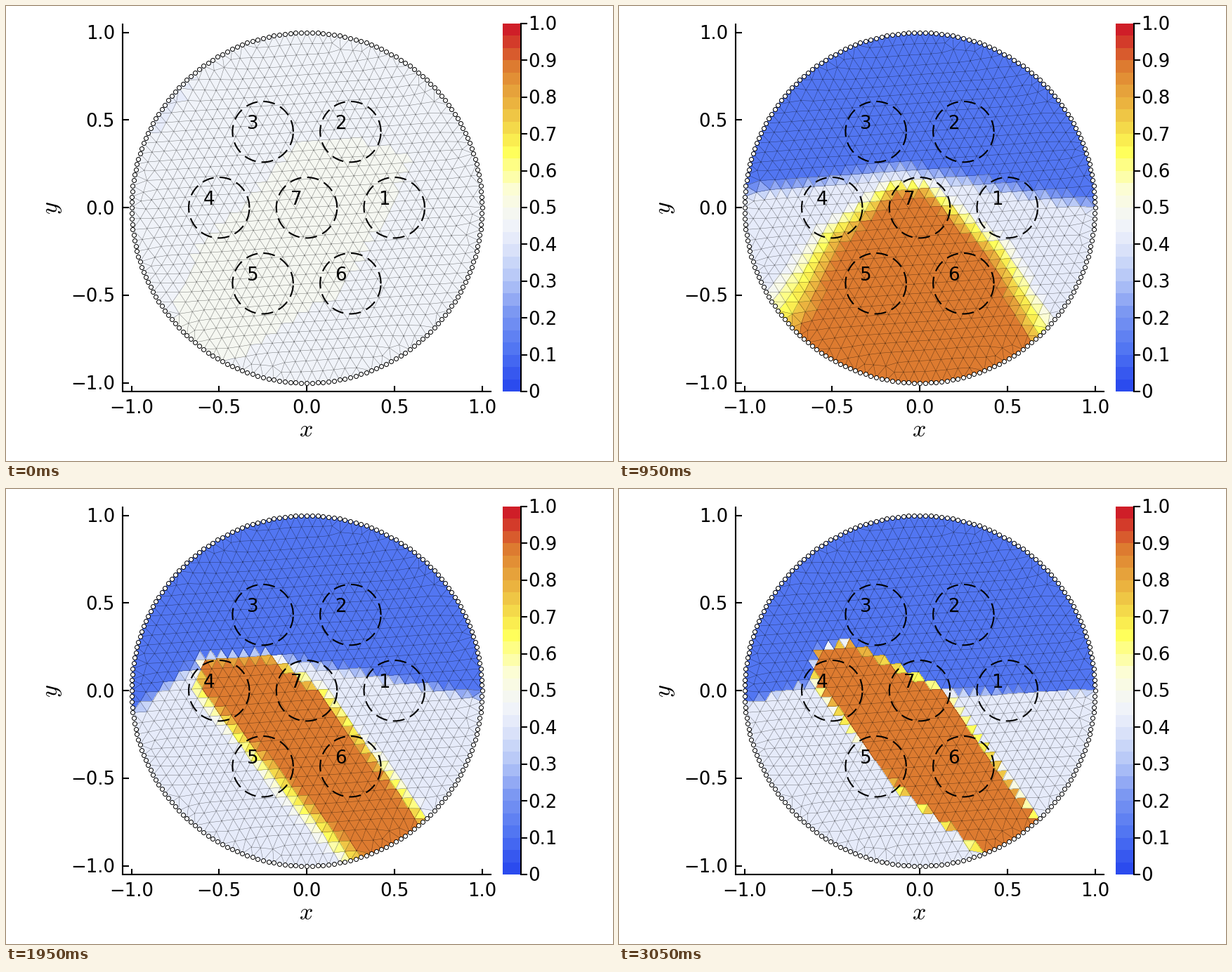
Write a matplotlib script that moves like this. It is 864 px wide and 648 px high and loops after 3.1 s.

```python
import numpy as np
import matplotlib.pyplot as plt
from matplotlib.animation import FuncAnimation
from matplotlib.colors import LinearSegmentedColormap, ListedColormap
from matplotlib.path import Path
from matplotlib.tri import Triangulation

FRAMES, STEP = 62, 50
CX, CY, R = 428, 287.2, 249.5
LEVELS = 30
LOW, MID, HIGH = 0.11, 0.41, 0.895

STOPS = [(0, "#2b4bee"), (.103, "#5276f2"), (.2, "#7a96f2"), (.3, "#b6c7f7"),
         (.414, "#e7ecfa"), (.448, "#f0f3f9"), (.483, "#f5f7f1"),
         (.55, "#fcfdd7"), (.66, "#ffff55"), (.72, "#f5dc4b"),
         (.897, "#dd7c30"), (1, "#cf1e28")]
ramp = LinearSegmentedColormap.from_list("heat", STOPS)
cmap = ListedColormap(ramp(np.linspace(0, 1, LEVELS)))

# Time, softness at the top and lower left, height of the upper front at
# KNOTS, outline of the hot region.
KNOTS = [180, 260, 400, 677]
KEYS = [
    (350, (34, 34), (247, 247, 256, 276),
     [(110, 640), (150, 480), (170, 348), (300, 343), (450, 361),
      (700, 404), (695, 650)]),
    (950, (24, 85), (263, 254, 228, 283),
     [(110, 640), (236, 430), (300, 325), (390, 256), (438, 258),
      (545, 350), (695, 650)]),
    (1500, (20, 45), (302, 261, 245, 315),
     [(500, 520), (400, 428), (310, 285), (315, 252), (398, 249),
      (545, 372), (565, 515)]),
    (1950, (15, 35), (318, 255, 240, 296),
     [(500, 535), (422, 455), (272, 285), (278, 242), (374, 236),
      (450, 288), (640, 527)]),
    (2300, (11, 21), (323, 258, 246, 297),
     [(505, 528), (375, 412), (273, 267), (284, 223), (350, 221),
      (445, 288), (640, 527)]),
    (3050, (8, 8), (306, 278, 290, 287),
     [(517, 519), (395, 426), (275, 271), (281, 229), (327, 217),
      (463, 286), (640, 535)]),
]
TIMES = [k[0] for k in KEYS]
SHAPES = [[np.array(p, float) for p in k[1:]] for k in KEYS]

WARM_START = [(412, 195), (500, 188), (575, 212), (545, 290), (478, 405),
              (310, 512), (235, 445), (275, 340), (340, 280)]
COOL_START = [(275, 92), (213, 184), (195, 180), (225, 125)]


def make_mesh(h=15.6, tilt=np.radians(4), rim_count=100):
    """Tilted triangular lattice, relaxed towards the round rim."""
    a = 2 * np.pi * np.arange(rim_count) / rim_count
    rim = R * np.c_[np.cos(a), np.sin(a)]
    i, j = np.meshgrid(np.arange(-40, 41), np.arange(-40, 41))
    u, v = (i + j / 2) * h, j * h * np.sqrt(3) / 2
    pts = np.c_[(u * np.cos(tilt) + v * np.sin(tilt)).ravel(),
                (v * np.cos(tilt) - u * np.sin(tilt)).ravel()]
    pts = pts[np.hypot(*pts.T) < R - 0.62 * h]
    pts = np.r_[rim, pts]
    loose = np.hypot(*pts.T) > 0.86 * R
    loose[:rim_count] = False
    for _ in range(6):
        edges = Triangulation(*pts.T).edges
        total, count = np.zeros_like(pts), np.zeros(len(pts))
        for p, q in (edges.T, edges.T[::-1]):
            np.add.at(total, p, pts[q])
            np.add.at(count, p, 1)
        pts[loose] = (total / count[:, None])[loose]
    return Triangulation(pts[:, 0] + CX, pts[:, 1] + CY)


mesh = make_mesh()
cells = np.c_[mesh.x, mesh.y][mesh.triangles].mean(axis=1)
cell_x, cell_y = cells.T
depth = np.clip((cell_y - 250) / 180, 0, 1)
left_side = cell_x < 380 + 0.5 * (cell_y - 250)


def inside(poly):
    return Path(poly).contains_points(cells)


def signed_distance(poly):
    d = np.roll(poly, -1, axis=0) - poly
    rel = cells[:, None] - poly
    s = np.clip((rel * d).sum(-1) / (d * d).sum(-1), 0, 1)
    gap = rel - s[..., None] * d
    dist = np.hypot(gap[..., 0], gap[..., 1]).min(axis=1)
    return np.where(inside(poly), dist, -dist)


def shapes_at(t):
    k = int(np.clip(np.searchsorted(TIMES, t) - 1, 0, len(TIMES) - 2))
    s = np.clip((t - TIMES[k]) / (TIMES[k + 1] - TIMES[k]), 0, 1)
    return [p + (q - p) * s for p, q in zip(SHAPES[k], SHAPES[k + 1])]


start = np.full(len(cells), 0.45)
start[inside(WARM_START)] = 0.48
start[inside(COOL_START)] = 0.42


def field(t):
    (top, low), front, outline = shapes_at(t)
    y = np.interp(cell_x, KNOTS, front)
    base = LOW + (MID - LOW) * np.clip((cell_y - y) / top + 0.5, 0, 1)
    width = top + (low - top) * depth * np.where(left_side, 1, 0.5)
    hot = np.clip(signed_distance(outline) / width + 0.5, 0, 1)
    u = base + (HIGH - base) * hot
    s = min(t / TIMES[0], 1)
    return start + (u - start) * (1 - (1 - s) ** 2)


fig = plt.figure(figsize=(12, 9), dpi=72, facecolor="white")
ax = fig.add_axes([0, 0, 1, 1])
ax.set(xlim=(0, 864), ylim=(648, 0))
ax.axis("off")
ax.set_autoscale_on(False)


def label(x, y, s, ha="center"):
    ax.text(x, y + 9.4, s, size=26, family="DejaVu Sans", ha=ha, va="baseline")


def fmt(v):
    return f"{v:.1f}".replace("-", "\u2212")


heat = ax.tripcolor(mesh, facecolors=start, cmap=cmap, vmin=0, vmax=1)
ax.triplot(mesh, color="black", lw=0.5, alpha=0.5)

ang = 2 * np.pi * np.arange(200) / 200
ax.plot(CX + R * np.cos(ang), CY - R * np.sin(ang), "o", ms=6,
        mfc="white", mec="black", mew=1)

# Numbered discs
turn = np.linspace(0, 2 * np.pi, 181)
for n in range(1, 8):
    dist = 0 if n == 7 else 0.5 * R
    a = np.radians(60 * (n - 1))
    x, y = CX + dist * np.cos(a), CY - dist * np.sin(a)
    r = 0.1732 * R
    ax.plot(x + r * np.cos(turn), y - r * np.sin(turn), color="black",
            lw=2.1, ls=(0, (8, 4)))
    label(x - 14.4, y - 13.8, str(n))

# Axes
line = dict(color="black", lw=2.1)
ax.vlines(166, 25, 550, **line)
ax.hlines(549, 165, 690.5, **line)
for v in np.linspace(-1, 1, 5):
    x, y = CX + R * v, CY - R * v
    ax.vlines(x, 541, 549, **line)
    ax.hlines(y, 166, 174.5, **line)
    label(x, 571, fmt(v))
    label(155, y, fmt(v), "right")
ax.text(427, 613, "$x$", size=34, math_fontfamily="cm", ha="center", va="baseline")
ax.text(66, 288, "$y$", size=34, math_fontfamily="cm", rotation=90,
        ha="center", va="center")

# Colour bar
ax.pcolormesh([707, 733], np.linspace(549, 25, LEVELS + 1),
              (np.arange(LEVELS)[:, None] + 0.5) / LEVELS,
              cmap=cmap, vmin=0, vmax=1)
ax.vlines(733, 24, 550, **line)
for k in range(11):
    y = 549 - 52.4 * k
    ax.hlines(y, 733, 742, **line)
    label(743, y, fmt(k / 10) if k else "0", "left")


def update(i):
    heat.set_array(field(i * STEP))
    return [heat]


anim = FuncAnimation(fig, update, frames=FRAMES, interval=STEP,
                     repeat=True, repeat_delay=0, blit=False)
plt.show()
```
